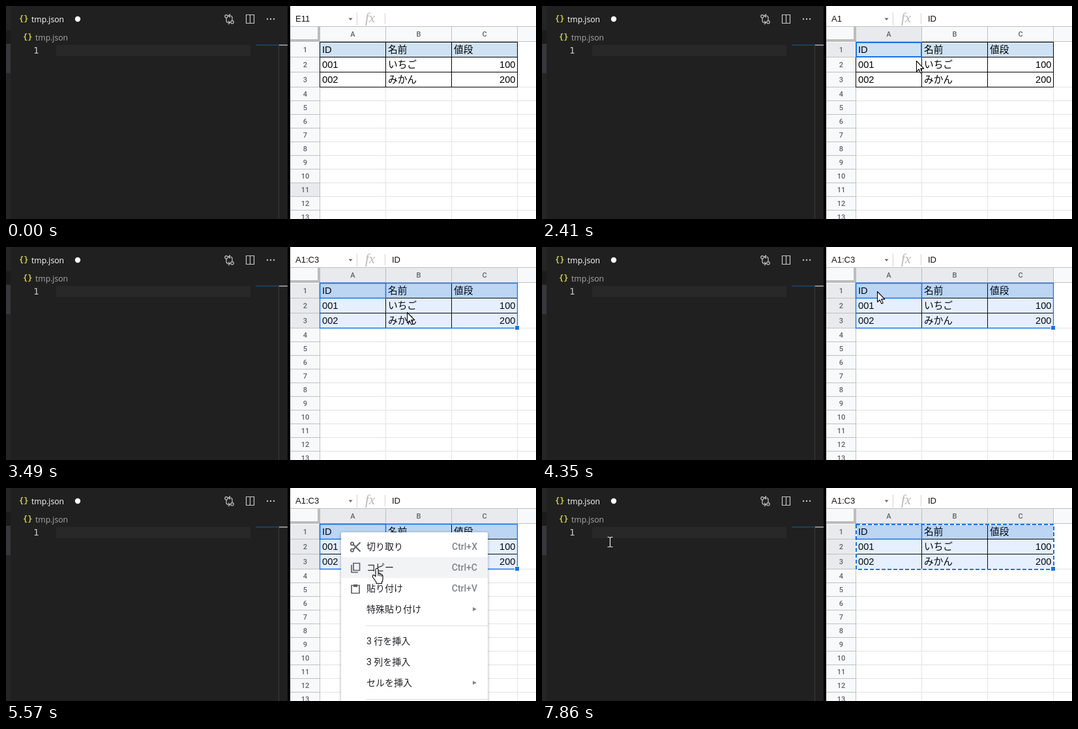
An HTML page for the animation above (8 s loop, 813 px wide and 327 px high).

```html
<!DOCTYPE html>
<html lang="ja">
<head>
<meta charset="utf-8">
<style>
html, body { margin: 0; width: 100%; height: 100%; overflow: hidden; background: #fff; }
svg { display: block; width: 813px; height: 327px; }
rect { shape-rendering: crispEdges; }
text { white-space: pre; }
.ui { font: 12.2px "Open Sans", "Noto Sans", sans-serif; }
.brace { font: bold 12px "DejaVu Sans Mono", monospace; fill: #cbcb41; }
.num { font: 14px "DejaVu Sans Mono", monospace; fill: #c6c6c6; }
.fx { font: italic 21px "Liberation Serif", serif; fill: #b8b8b8; }
.bar { font: 13px "Liberation Sans", sans-serif; fill: #111; }
.head { font: 500 11px Roboto, sans-serif; fill: #5f6368; text-anchor: middle; }
.cell { font: 14.67px "Liberation Sans", "Noto Sans CJK JP", sans-serif; fill: #000; }
.item { font: 14px Roboto, "Noto Sans CJK JP", sans-serif; fill: #202124; }
.key { font: 500 14px Roboto, sans-serif; fill: #80868b; text-anchor: end; }
.end { text-anchor: end; }
.menu { filter: drop-shadow(0 1px 2px rgba(0,0,0,.35)); }
</style>
</head>
<body>
<svg viewBox="0 0 813 327" xmlns="http://www.w3.org/2000/svg">
  <g id="base"></g><g id="heads"></g><g id="table"></g>
  <g id="range"></g><g id="menu"></g><g id="pointer"></g>
</svg>
<script>
const LOOP = 8000, STEP = 120, BLUE = '#1a73e8';
const $ = id => document.getElementById(id);
const rect = (x, y, w, h, fill, more = '') =>
  `<rect x="${x}" y="${y}" width="${w}" height="${h}" fill="${fill}" ${more}/>`;
const text = (x, y, cls, str, more = '') => `<text x="${x}" y="${y}" class="${cls}" ${more}>${str}</text>`;
const line = (d, color, w = 1, more = '') =>
  `<path d="${d}" fill="none" stroke="${color}" stroke-width="${w}" ${more}/>`;
const range = (n, f) => Array.from({ length: n }, (_, i) => f(i)).join('');

// Grid geometry, columns and rows counted from 1
const colX = c => 481 + (c - 1) * 101;
const rowY = r => r <= 4 ? 55 + (r - 1) * 23 : 124 + (r - 4) * 21;
const colAt = x => Math.max(1, Math.floor((x - 481) / 101) + 1);
const rowAt = y => Math.max(1, Math.floor((y - 55) / 23) + 1);
const cellName = (c, r) => 'ABCDE'[c - 1] + r;

function drawBase() {
  const icon = '#c5c5c5';
  $('base').innerHTML =
    rect(0, 0, 432, 327, '#202020') + rect(0, 0, 7, 327, '#252526') +
    rect(0, 37, 7, 21, '#1c1c1c') + rect(0, 58, 7, 45, '#37373d') +
    text(20, 24, 'brace', '{}') + text(39, 25, 'ui', 'tmp.json', 'fill="#fff"') +
    '<circle cx="110" cy="20" r="4.2" fill="#fff"/>' +
    line('M338 18V22.5Q338 25.5 341 25.5H343M341 23L343.6 25.5L341 28M347 22.5V18Q347 15 344 15H341.5M344 12.5L341.4 15L344 17.5', icon, 1.2) +
    `<circle cx="338" cy="15.8" r="2.2" fill="none" stroke="${icon}" stroke-width="1.2"/>` +
    `<circle cx="347" cy="24.8" r="2.2" fill="none" stroke="${icon}" stroke-width="1.2"/>` +
    line('M368.5 13.5H380.5V26.5H368.5ZM374.5 13.5V26.5', icon, 1.2) +
    range(3, i => `<circle cx="${401 + i * 5}" cy="20" r="1.2" fill="${icon}"/>`) +
    text(26, 52, 'brace', '{}') + text(45, 53, 'ui', 'tmp.json', 'fill="#a9a9a9"') +
    text(42, 73, 'num', '1') +
    rect(77, 60, 298, 17, '#282828') +
    rect(418, 58, 1, 269, '#3b3b3b') + rect(383, 59, 35, 2, '#203c5c') + rect(419, 59, 13, 2, '#8c8c8c') +
    rect(432, 0, 4, 327, '#000') +
    rect(436, 0, 377, 327, '#fff') +
    `<path d="M525.5 18.5H531.5L528.5 22Z" fill="#666"/>` +
    rect(538, 10, 1, 20, '#d5d5d5') + rect(581, 11, 1, 17, '#d5d5d5') +
    text(551, 25, 'fx', 'fx');
}

function drawTable() {
  const rows = [['ID', '名前', '値段'], ['001', 'いちご', '100'], ['002', 'みかん', '200']];
  let out = range(10, i => rect(482, rowY(i + 4), 331, 1, '#e2e3e3')) +
    range(4, i => rect(colX(i + 1), 55, 1, 272, i ? '#e2e3e3' : '#c0c0c0')) +
    rect(482, 55, 303, 23, '#cfe2f3');
  out += range(4, i => rect(481, rowY(i + 1), 304, 1, '#000') + rect(colX(i + 1), 55, 1, 70, '#000'));
  rows.forEach((row, r) => row.forEach((s, c) => {
    const right = r > 0 && c === 2;
    out += text(right ? 781.5 : colX(c + 1) + 4, 72 + r * 23, right ? 'cell end' : 'cell', s);
  }));
  $('table').innerHTML = out;
}

function drawHeads(sel) {
  const tone = on => on ? '#e8eaed' : '#f8f9fa';
  const hitC = c => c >= sel.c0 && c <= sel.c1, hitR = r => r >= sel.r0 && r <= sel.r1;
  const first = cellName(sel.c0, sel.r0), last = cellName(sel.c1, sel.r1);
  $('heads').innerHTML =
    text(444, 24, 'bar', first === last ? first : first + ':' + last) +
    (sel.c0 === 1 ? text(592, 24, 'bar', 'ID') : '') +
    range(4, i => rect(colX(i + 1) + 1, 32, 100, 23, tone(hitC(i + 1))) +
      rect(colX(i + 2), 32, 1, 23, '#c0c0c0') +
      (i < 3 ? text(colX(i + 1) + 51, 47, 'head', 'ABC'[i]) : '')) +
    range(13, i => {
      const r = i + 1, y = rowY(r), h = rowY(r + 1) - y;
      return rect(436, y + 1, 45, h, tone(hitR(r))) + rect(436, y + h, 45, 1, '#c0c0c0') +
        text(459, y + h / 2 + 4, 'head', r);
    }) +
    rect(436, 31, 377, 1, '#c0c0c0') + rect(482, 54, 331, 1, '#c0c0c0') +
    rect(436, 32, 42, 19, '#f8f9fa') + rect(436, 51, 46, 4, '#bcbcbc') + rect(478, 32, 4, 23, '#bcbcbc');
}

function drawRange(sel, mode) {
  if (sel.c0 !== 1) return $('range').innerHTML = '';
  const w = colX(sel.c1 + 1) - 481, h = rowY(sel.r1 + 1) - 55;
  const wide = sel.c1 > 1 || sel.r1 > 1;
  let out = wide ? rect(482, 56, w, h, '#0e65eb', 'fill-opacity=".1"') : '';
  out += line(wide ? 'M481.5 55.5H582.5V78.5H481.5Z' : 'M482 56H582V78H482Z', BLUE, wide ? 1.5 : 2);
  if (mode > 0) {
    out += mode > 1
      ? line('M482 56H785V125H482Z', '#fff', 2) + line('M482 56H785V125H482Z', BLUE, 2, 'stroke-dasharray="6 3"')
      : line('M481.5 55.5H784.5V124.5H481.5Z', BLUE, 1.3);
    out += rect(780, 120, 8, 8, '#fff') + rect(781, 121, 6, 6, BLUE);
  }
  $('range').innerHTML = out;
}

function drawMenu(open, hover) {
  if (!open) return $('menu').innerHTML = '';
  const ink = '#5f6368';
  const items = [['切り取り', 'Ctrl+X'], ['コピー', 'Ctrl+C'], ['貼り付け', 'Ctrl+V'], ['特殊貼り付け', '>'],
    ['3 行を挿入'], ['3 列を挿入'], ['セルを挿入', '>']];
  let out = '<rect class="menu" x="514" y="68" width="225" height="280" rx="3" fill="#fff"/>';
  if (hover >= 0) out += rect(514, 74 + hover * 32, 225, 32, '#f1f3f4');
  items.forEach(([label, key], i) => {
    const y = 90 + i * 32 + (i > 3 ? 17 : 0);
    out += text(553, y + 5, 'item', label);
    if (key === '>') out += `<path d="M716 ${y - 3}L722 ${y}L716 ${y + 3}Z" fill="#80868b"/>`;
    else if (key) out += text(723, y + 5, 'key', key);
  });
  out += rect(552, 211, 187, 1, '#dadce0') + rect(552, 324, 187, 1, '#dadce0') +
    line('M533 87L543.5 97.5M533 94L543.5 83.5', ink, 2) +
    `<g fill="none" stroke="${ink}" stroke-width="1.8"><circle cx="531" cy="85.5" r="2.2"/><circle cx="531" cy="95.5" r="2.2"/></g>` +
    line('M533 115.5H542.5V126.5H533ZM530 118V129.5H540', ink, 1.7) +
    line('M530 149.5H542V161.5H530Z', ink, 1.7) + rect(533, 148, 6, 4, ink);
  $('menu').innerHTML = out;
}

// start, steps, target x and y, deceleration power
const moves = [
  [630, 3, 719, 177, 1], [1020, 7, 519, 70, 2.65], [1860, 1, 516, 68, 1],
  [2290, 6, 689, 116, 1], [3010, 1, 706, 116, 1], [3130, 6, 570, 92, 1],
  [3870, 5, 514, 68, 1.6], [4970, 6, 567, 122, 1.5], [7000, 2, 464, 118, 1], [7260, 6, 104, 83, 2]
];

function cursorAt(t) {
  let x = 838, y = 268;
  for (const [start, n, tx, ty, p] of moves) {
    if (t < start) break;
    const k = Math.min(1, (Math.floor((t - start) / STEP) + 1) / n);
    const e = 1 - Math.pow(1 - k, p);
    x += (tx - x) * e;
    y += (ty - y) * e;
    if (k < 1) break;
  }
  return { x: Math.round(x), y: Math.round(y) };
}

function selectionAt(t) {
  if (t < 2140) return { c0: 5, r0: 11, c1: 5, r1: 11 };
  // the highlight trails the pointer by one step
  const p = t < 2290 ? { x: 516, y: 68 } : t < 3010 ? cursorAt(t - STEP) : { x: 700, y: 110 };
  return { c0: 1, r0: 1, c1: colAt(p.x), r1: rowAt(p.y) };
}

function drawPointer(p, kind) {
  const at = (dx, dy, body) => `<g transform="translate(${p.x + dx} ${p.y + dy})">${body}</g>`;
  const shape = d => `<path d="${d}" fill="#fff" stroke="#000" stroke-width="1.1" stroke-linejoin="round"/>`;
  $('pointer').innerHTML =
    kind === 'arrow' ? at(.5, .5, shape('M0 0V16L3.7 12.6L6.2 18.4L8.6 17.4L6.1 11.6H11.3Z')) :
    kind === 'hand' ? at(2, 1, shape('M-2 2Q-2 .5 0 .5T2 2V8Q4.5 7 4.7 9Q7 8.3 7.2 10Q9 10 9 12V17Q9 20 7.5 21.5V23.5H-1V21.5L-6 14.5Q-7.5 11.5-6 10.8Q-4 10-2 13Z') +
      line('M2 8V12M4.7 9V12.5M7.2 10V13', '#000')) :
    kind === 'beam' ? at(.5, 0, line('M-4 -7.5H-1.5L0 -6.5L1.5 -7.5H4M0 -6.5V6.5M-4 7.5H-1.5L0 6.5L1.5 7.5H4', '#e6e6e6', 1.2)) : '';
}

let shown = '';
function render(t) {
  const p = cursorAt(t), sel = selectionAt(t);
  const open = t >= 4720 && t < 6470;
  const mode = t >= 6470 ? 2 : t >= 3130 ? 1 : 0;
  const hover = open && p.y >= 74 ? Math.floor((p.y - 74) / 32) : -1;
  const kind = t < 630 ? 'none' : p.x < 434 ? 'beam' : hover >= 0 ? 'hand' : 'arrow';
  const state = JSON.stringify([p, sel, open, mode, hover, kind]);
  if (state === shown) return;
  shown = state;
  drawHeads(sel);
  drawRange(sel, mode);
  drawMenu(open, hover);
  drawPointer(p, kind);
}

drawBase();
drawTable();
const began = performance.now();
function tick() {
  render((performance.now() - began) % LOOP);
  requestAnimationFrame(tick);
}
tick();
</script>
</body>
</html>
```
